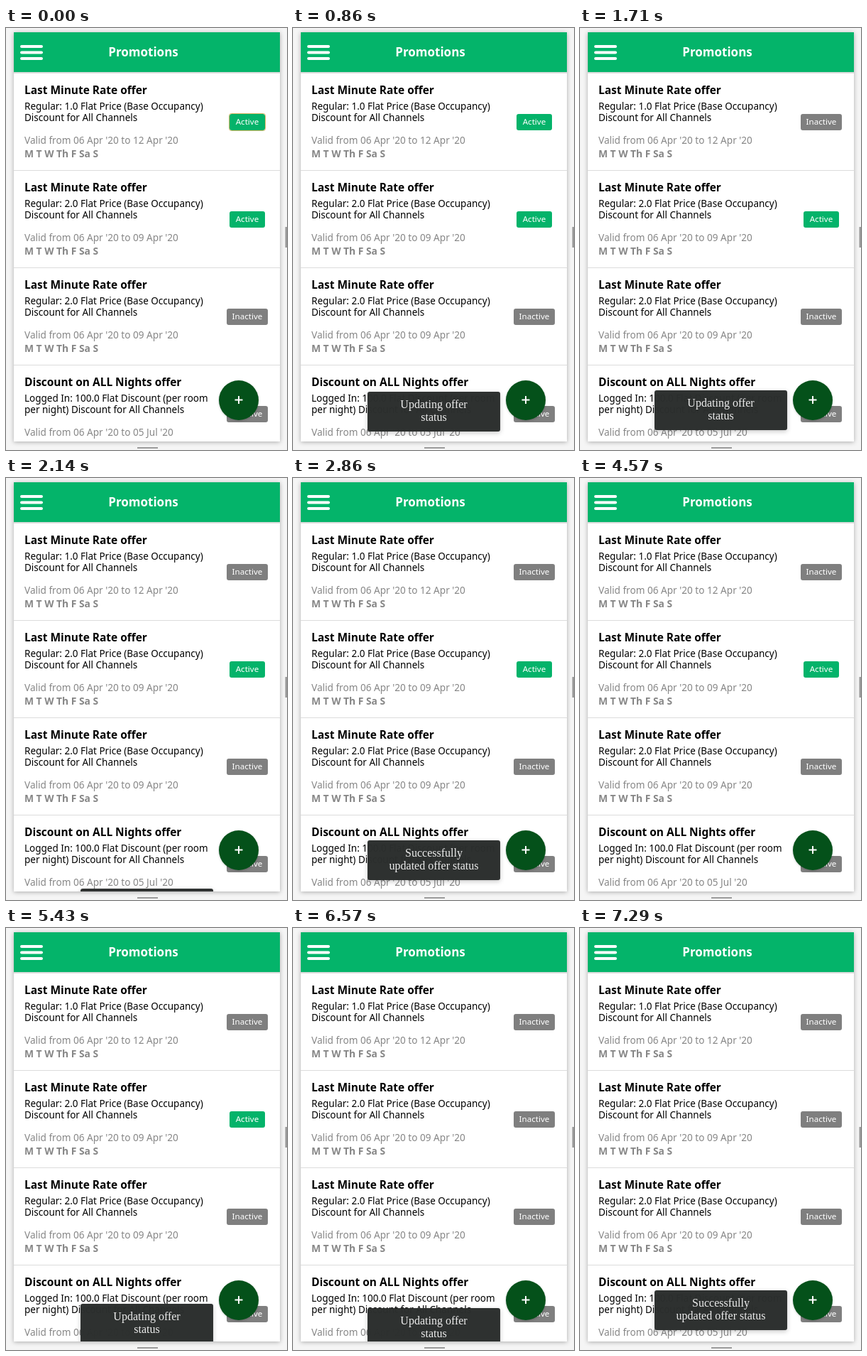
Recreate the animation shown at these times as an HTML page. Size 396 by 594 pixels, loop 8140 ms.

```html
<!DOCTYPE html>
<html lang="en">
<head>
<meta charset="utf-8">
<title>Promotions</title>
<style>
  html, body { margin: 0; width: 100%; height: 100%; overflow: hidden; background: #f5f5f5; }
  svg { display: block; width: 396px; height: 594px; font-family: "Noto Sans", "Open Sans", sans-serif; }
  .bar { fill: #04b46a; }
  .heading { font-size: 17px; font-weight: 700; fill: #fff; text-anchor: middle; }
  .title { font-size: 15.45px; font-weight: 700; }
  .body { font-size: 13.5px; }
  .date { font-size: 13.6px; fill: #868686; }
  .days { font-size: 13.8px; font-weight: 700; fill: #868686; }
  .badge text { font-size: 11.6px; fill: #fff; text-anchor: middle; }
  .on rect { fill: #04b36a; }
  .off rect { fill: #7f7f7f; }
  .ring { fill: none; stroke: #d9b562; }
  .rule { fill: #dcdcdc; }
  .handle { fill: #9a9a9a; }
  .frame { filter: drop-shadow(0 1px 3px rgba(0, 0, 0, .3)); }
  .fab { filter: drop-shadow(0 1px 1.5px rgba(0, 0, 0, .2)); }
  #toast { filter: drop-shadow(0 2px 3px rgba(0, 0, 0, .22)); }
  #toast text { font: 16px "Liberation Serif", serif; fill: #ececec; text-anchor: middle; }
</style>
</head>
<body>
<svg viewBox="0 0 396 594">
  <defs><clipPath id="screen"><rect x="11" y="6" width="375" height="576"/></clipPath></defs>
  <rect class="frame" x="11" y="6" width="375" height="576" fill="#fff"/>
  <g clip-path="url(#screen)">
    <g id="list"></g>
    <rect class="bar" x="11" y="6" width="375" height="56"/>
    <rect class="rule" x="11" y="62" width="375" height="2"/>
    <path d="M22 26h28M22 34.5h28M22 43h28" stroke="#fff" stroke-width="4" stroke-linecap="round"/>
    <text class="heading" x="193.5" y="40">Promotions</text>
    <g class="fab">
      <circle cx="328" cy="524" r="28" fill="#04511a"/>
      <path d="M322.5 523.5h11M328 518v11" stroke="#fff" stroke-width="2"/>
    </g>
    <g id="toast">
      <rect x="105" width="187" height="56" rx="3" fill="#2b2e2d" fill-opacity=".98"/>
      <text x="198.5" y="23"></text>
      <text x="198.5" y="41"></text>
    </g>
  </g>
  <rect class="handle" x="393.5" y="280" width="3" height="29"/>
  <rect class="handle" x="185" y="590" width="29" height="2"/>
</svg>
<script>
const LOOP = 8140, FPS = 7;
const TOAST_TOP = 510, TOAST_TRAVEL = 74, ENTER = 400, LEAVE = 300;

const rate = n => [`Regular: ${n}.0 Flat Price (Base Occupancy)`, "Discount for All Channels"];
const offers = [
  { title: "Last Minute Rate offer", body: rate(1), end: "12 Apr" },
  { title: "Last Minute Rate offer", body: rate(2), end: "09 Apr" },
  { title: "Last Minute Rate offer", body: rate(2), end: "09 Apr" },
  { title: "Discount on ALL Nights offer",
    body: ["Logged In: 100.0 Flat Discount (per room", "per night) Discount for All Channels"], end: "05 Jul" }
];

const UPDATING = ["Updating offer", "status"];
const UPDATED = ["Successfully", "updated offer status"];
const toasts = [
  { text: UPDATING, from: 600, to: 2007 },
  { text: UPDATED, from: 2420, to: 3830 },
  { text: UPDATING, from: 5320, to: 6528 },
  { text: UPDATED, from: 6890, to: LOOP }
];

// When each offer is focused and when it is switched off
const states = [
  { focus: [0, 290], off: 1280 },
  { focus: [4990, 5290], off: 5990 },
  { off: 0 },
  { off: 0 }
];

const line = (cls, y, text) => `<text class="${cls}" x="26" y="${y}">${text}</text>`;

document.getElementById("list").innerHTML = offers.map((o, i) => `
  <g transform="translate(0 ${i * 137})">
    ${line("title", 93, o.title)}
    ${line("body", 115, o.body[0])}
    ${line("body", 131, o.body[1])}
    ${line("date", 163, `Valid from 06 Apr '20 to ${o.end} '20`)}
    ${line("days", 182, "M T W Th F Sa S")}
    <rect class="rule" x="11" y="200" width="375" height="1"/>
    <g class="badge"><rect y="121" height="23" rx="3"/><text x="340" y="136"></text></g>
    <rect class="ring" x="314.5" y="120.5" width="51" height="24" rx="3"/>
  </g>`).join("");

const badges = [...document.querySelectorAll(".badge")];
const rings = [...document.querySelectorAll(".ring")];
const toast = document.getElementById("toast");
const toastLines = toast.querySelectorAll("text");

// cubic-bezier(.36, .66, .04, 1)
const curve = (s, a, b) => 3 * (1 - s) ** 2 * s * a + 3 * (1 - s) * s * s * b + s ** 3;
function ease(x) {
  if (x <= 0) return 0;
  if (x >= 1) return 1;
  let lo = 0, hi = 1;
  for (let i = 0; i < 20; i++) {
    const mid = (lo + hi) / 2;
    if (curve(mid, .36, .04) < x) lo = mid; else hi = mid;
  }
  return curve(lo, .66, 1);
}

function drawBadge(i, t) {
  const { focus, off } = states[i];
  const active = t < off;
  const [box, label] = badges[i].children;
  badges[i].setAttribute("class", active ? "badge on" : "badge off");
  box.setAttribute("x", active ? 315 : 311);
  box.setAttribute("width", active ? 50 : 58);
  label.textContent = active ? "Active" : "Inactive";
  rings[i].style.display = focus && t >= focus[0] && t < focus[1] ? "" : "none";
}

function drawToast(t) {
  const now = toasts.find(n => t >= n.from && t < n.to + LEAVE);
  toast.style.display = now ? "" : "none";
  if (!now) return;
  const shown = ease((t - now.from) / ENTER) - ease((t - now.to) / LEAVE);
  const y = Math.round(TOAST_TOP + TOAST_TRAVEL * (1 - shown));
  toast.setAttribute("transform", `translate(0 ${y})`);
  now.text.forEach((s, i) => toastLines[i].textContent = s);
}

function draw(ms) {
  const t = Math.floor((ms % LOOP + 5) * FPS / 1000) * 1000 / FPS;
  offers.forEach((_, i) => drawBadge(i, t));
  drawToast(t);
}

const start = performance.now();
function tick() {
  draw(performance.now() - start);
  requestAnimationFrame(tick);
}
tick();
</script>
</body>
</html>
```
